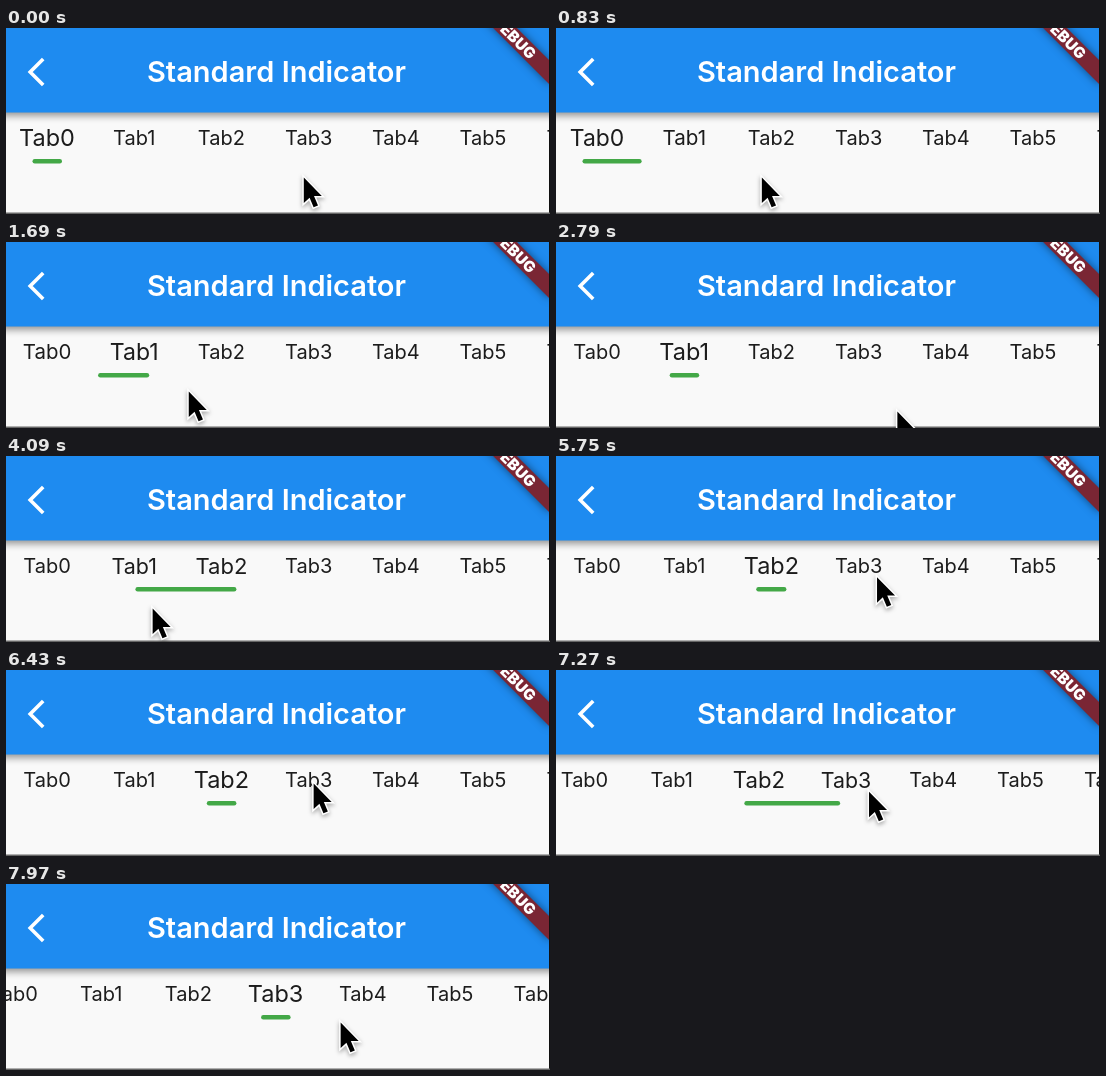
Animation of 544 by 186 pixels, one loop 7990 ms. Source, as an HTML page with a canvas:

```html
<!DOCTYPE html>
<html lang="en">
<head>
<meta charset="utf-8">
<title>Standard Indicator</title>
<style>
  html, body { margin: 0; width: 544px; height: 186px; overflow: hidden; }
  canvas { display: block; }
</style>
</head>
<body>
<canvas id="stage" width="544" height="186"></canvas>
<script>
const ctx = document.getElementById('stage').getContext('2d');
const LOOP = 7990;
const SCREEN_WIDTH = 541;
const FONT = 'Inter, "Open Sans", sans-serif';

// Progress from 0 to 1, eased at both ends.
function ramp(t, from, to) {
  const f = Math.min(1, Math.max(0, (t - from) / (to - from)));
  return f * f * (3 - 2 * f);
}

// Progress from 0 towards 1, fast at first.
const settle = (t, from, tau) => t < from ? 0 : 1 - Math.exp((from - t) / tau);

// Two swipes that follow the pointer and spring on when let go, then a tap.
function pose(t) {
  const drag = .17 * ramp(t, 20, 730) + .23 * ramp(t, 830, 1390) + .36 * ramp(t, 3510, 3810);
  const release = .6 * settle(t, 1530, 102) + .64 * settle(t, 3935, 350);
  return {
    page: drag + release + ramp(t, 6990, 7660),
    x: 297 - SCREEN_WIDTH * drag
      + 154 * settle(t, 1530, 150) + 106 * ramp(t, 2270, 2790)
      + 193 * ramp(t, 4200, 5030) - 32 * ramp(t, 5030, 6330) + 27 * ramp(t, 6990, 7970),
    y: 148 + 20 * ramp(t, 2270, 2790) - 17 * ramp(t, 2790, 3510)
      - 21 * ramp(t, 4200, 5030) - 18 * ramp(t, 5030, 6330) + 25 * ramp(t, 6990, 7730)
  };
}

function rect(color, x, y, w, h) {
  ctx.fillStyle = color;
  ctx.fillRect(x, y, w, h);
}

function text(label, x, y, size, weight, color) {
  ctx.font = `${weight} ${size}px ${FONT}`;
  ctx.fillStyle = color;
  ctx.textAlign = 'center';
  ctx.fillText(label, x, y + size * .36);
}

function shadow(color, blur, y = 0) {
  ctx.shadowColor = color;
  ctx.shadowBlur = blur;
  ctx.shadowOffsetY = y;
}

const tabCenter = i => 41 + 87.2 * i;

function drawTabs(page) {
  ctx.save();
  ctx.translate(-33 * Math.max(0, page - 2), 0);
  for (let i = 0; i < 7; i++) {
    const focus = Math.max(0, 1 - Math.abs(page - i));
    text('Tab' + i, tabCenter(i), 110, 20 + 3.5 * focus, 400, '#1c1c1c');
  }
  // The leading edge moves in the first half, the trailing edge in the second.
  const base = Math.floor(page), f = page - base;
  const left = tabCenter(base + Math.max(0, 2 * f - 1)) - 14.5;
  const right = tabCenter(base + Math.min(1, 2 * f)) + 15;
  ctx.fillStyle = '#43a847';
  ctx.beginPath();
  ctx.roundRect(left, 131, right - left, 4.4, 2.2);
  ctx.fill();
  ctx.restore();
}

function drawHeader() {
  ctx.save();
  shadow('rgba(0,0,0,.4)', 7, 3);
  rect('#1e8bf0', -20, -20, 584, 104.5);
  ctx.restore();

  ctx.strokeStyle = '#fff';
  ctx.lineWidth = 3.6;
  ctx.beginPath();
  ctx.moveTo(37.2, 31);
  ctx.lineTo(24.2, 44);
  ctx.lineTo(37.2, 57);
  ctx.stroke();
  text('Standard Indicator', 270.5, 43.7, 29, 600, '#fff');

  ctx.save();
  ctx.translate(508, 9);
  ctx.rotate(Math.PI / 4);
  shadow('rgba(0,0,0,.5)', 8);
  rect('#7a2634', -58, -8.4, 116, 16.8);
  shadow('transparent', 0);
  text('DEBUG', .5, 0, 15.4, 900, '#fff');
  ctx.restore();
}

const arrow = new Path2D('M0 0V25.5L5.8 20.2L9.8 29.6L14.2 27.8L10.2 18.4H18Z');

function drawPointer(x, y) {
  ctx.save();
  ctx.translate(x + .8, y + 1.6);
  ctx.lineWidth = 3;
  ctx.strokeStyle = '#fff';
  shadow('rgba(0,0,0,.35)', 4, 2);
  ctx.stroke(arrow);
  shadow('transparent', 0);
  ctx.fillStyle = '#000';
  ctx.fill(arrow);
  ctx.restore();
}

function draw(t) {
  const { page, x, y } = pose(t);
  rect('#f9f9f9', 0, 0, 544, 186);
  drawTabs(page);
  drawHeader();
  rect('#111', 543, 0, 1, 186);
  rect('#666', 0, 184.5, 544, 1.5);
  drawPointer(x, y);
}

const start = performance.now();
function tick() {
  draw((performance.now() - start) % LOOP);
  requestAnimationFrame(tick);
}
tick();
</script>
</body>
</html>
```
